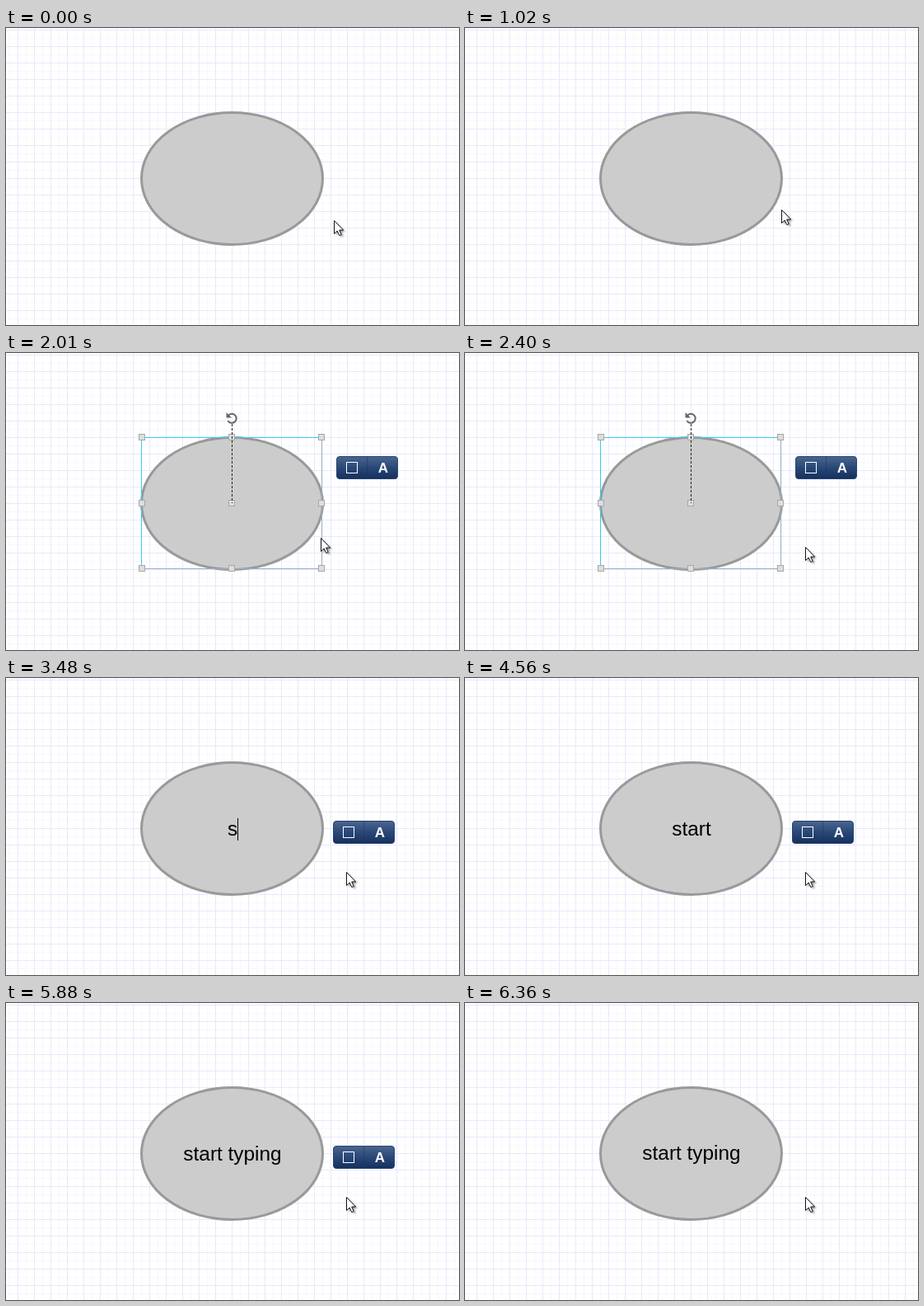
Animation, 550 px wide and 360 px high, one loop 9.57 s. Source, as an HTML page:

```html
<!DOCTYPE html>
<html lang="en">
<head>
<meta charset="utf-8">
<title>Type into a shape</title>
<style>
  html, body { margin: 0; width: 100%; height: 100%; overflow: hidden; background: #fff; }
  svg { display: block; }
  text { font-family: "Liberation Sans", Arial, sans-serif; text-anchor: middle; }
</style>
</head>
<body>
<svg width="550" height="360" viewBox="0 0 550 360">
  <defs>
    <pattern id="grid" x="14" y="2" width="20" height="20" patternUnits="userSpaceOnUse">
      <path d="M10.5 0V20M0 10.5H20" stroke="#f7f7ff"/>
      <path d="M.5 0V20M0 .5H20" stroke="#e8e8ff"/>
    </pattern>
    <linearGradient id="navy" x2="0" y2="1">
      <stop stop-color="#4a668f"/>
      <stop offset=".5" stop-color="#2a4877"/>
      <stop offset="1" stop-color="#14305f"/>
    </linearGradient>
    <filter id="soft" x="-50%" y="-50%" width="200%" height="200%">
      <feGaussianBlur stdDeviation="1"/>
    </filter>
    <path id="arrow" d="M.5 .5V16.5L4.2 13 6.8 18.6 9.2 17.5 6.7 12H11.6Z"/>
  </defs>

  <rect width="550" height="360" fill="url(#grid)"/>
  <ellipse cx="274.5" cy="182.5" rx="110" ry="80" fill="#ccc" stroke="#999" stroke-width="3"/>

  <g id="selection" fill="none">
    <path d="M164.5 261.5H383.5V102.5" stroke="#9aafbe"/>
    <path d="M164.5 261.5V102.5H383.5" stroke="#2fcdee"/>
    <g id="handles" fill="#ddd" stroke="#a8a8a8"></g>
    <path d="M274.5 86V182" stroke="#222" stroke-dasharray="3 2"/>
    <path d="M270.5 75.2A5.5 5.5 0 1 1 269.4 82" stroke="#666" stroke-width="2"/>
    <path d="M267.5 72V78.5H274Z" fill="#666"/>
  </g>

  <text id="label" x="275" font-size="24.4"></text>
  <rect id="caret" y="170" width="1" height="27"/>

  <g id="toolbar">
    <rect x=".5" y=".5" width="74" height="27" rx="3.5" fill="url(#navy)" stroke="#2b446c"/>
    <path d="M37.5 1V27" stroke="#1d3762" opacity=".6"/>
    <rect x="12.5" y="7.5" width="13" height="13" fill="none" stroke="#fff"/>
    <text x="57" y="20" font-size="17" font-weight="bold" fill="#fff">A</text>
  </g>

  <g id="pointer">
    <use href="#arrow" x="2.5" y="2" opacity=".4" filter="url(#soft)"/>
    <use href="#arrow" fill="#fff" stroke="#111"/>
  </g>
</svg>
<script>
const LOOP = 9570, STEP = 30, BLINK = 540;
const SELECT = 1740, EDIT = 3480, DONE = 6360;
const phrase = "start typing";
const keyTimes = [3480, 3540, 3630, 3750, 3840, 3990, 4710, 4800, 4950, 5100, 5250, 5340];
// time, x, y
const path = [
  [0, 398, 233], [930, 398, 233], [1110, 369, 206], [1230, 369, 206],
  [1290, 366, 208], [1440, 368, 211], [1890, 368, 211], [2190, 402, 244],
  [2310, 402, 244], [2400, 413, 235], [LOOP, 413, 235]
];
const el = id => document.getElementById(id);
const [selection, handles, label, caret, toolbar, pointer] =
  ["selection", "handles", "label", "caret", "toolbar", "pointer"].map(el);

const show = (node, on) => node.setAttribute("visibility", on ? "visible" : "hidden");
const move = (node, x, y) => node.setAttribute("transform", `translate(${x} ${y})`);

for (const x of [164.5, 274, 382.5])
  for (const y of [102.5, 182, 261])
    handles.innerHTML += `<rect x="${Math.floor(x) - 2.5}" y="${Math.floor(y) - 3.5}" width="7" height="7"/>`
      .replace(`x="${Math.floor(x) - 2.5}"`, `x="${Math.round(x) - 3.5}"`);

function pointerAt(t) {
  const i = path.findIndex(p => p[0] > t);
  const [t0, x0, y0] = path[i - 1], [t1, x1, y1] = path[i];
  const k = (t - t0) / (t1 - t0);
  return [Math.round(x0 + (x1 - x0) * k), Math.round(y0 + (y1 - y0) * k)];
}

function drawText(t) {
  const count = keyTimes.filter(k => k <= t).length;
  const typed = phrase.slice(0, count), word = typed.trimEnd();
  label.textContent = word;
  label.setAttribute("y", t < DONE ? 191 : 190);
  const blinkOn = count > 0 && (t - keyTimes[count - 1]) < BLINK;
  show(caret, blinkOn && t < DONE);
  if (!count) return;
  const space = (typed.length - word.length) * 6.8;
  caret.setAttribute("x", Math.floor(275 + label.getComputedTextLength() / 2 + space));
}

function draw(now) {
  const t = Math.floor((now % LOOP) / STEP) * STEP;
  show(selection, t >= SELECT && t < EDIT);
  show(toolbar, t >= SELECT && t < DONE);
  move(toolbar, ...(t < EDIT ? [401, 125] : [397, 173]));
  move(pointer, ...pointerAt(t));
  drawText(t);
}

const start = performance.now();
function tick() {
  draw(performance.now() - start);
  requestAnimationFrame(tick);
}
tick();
</script>
</body>
</html>
```
